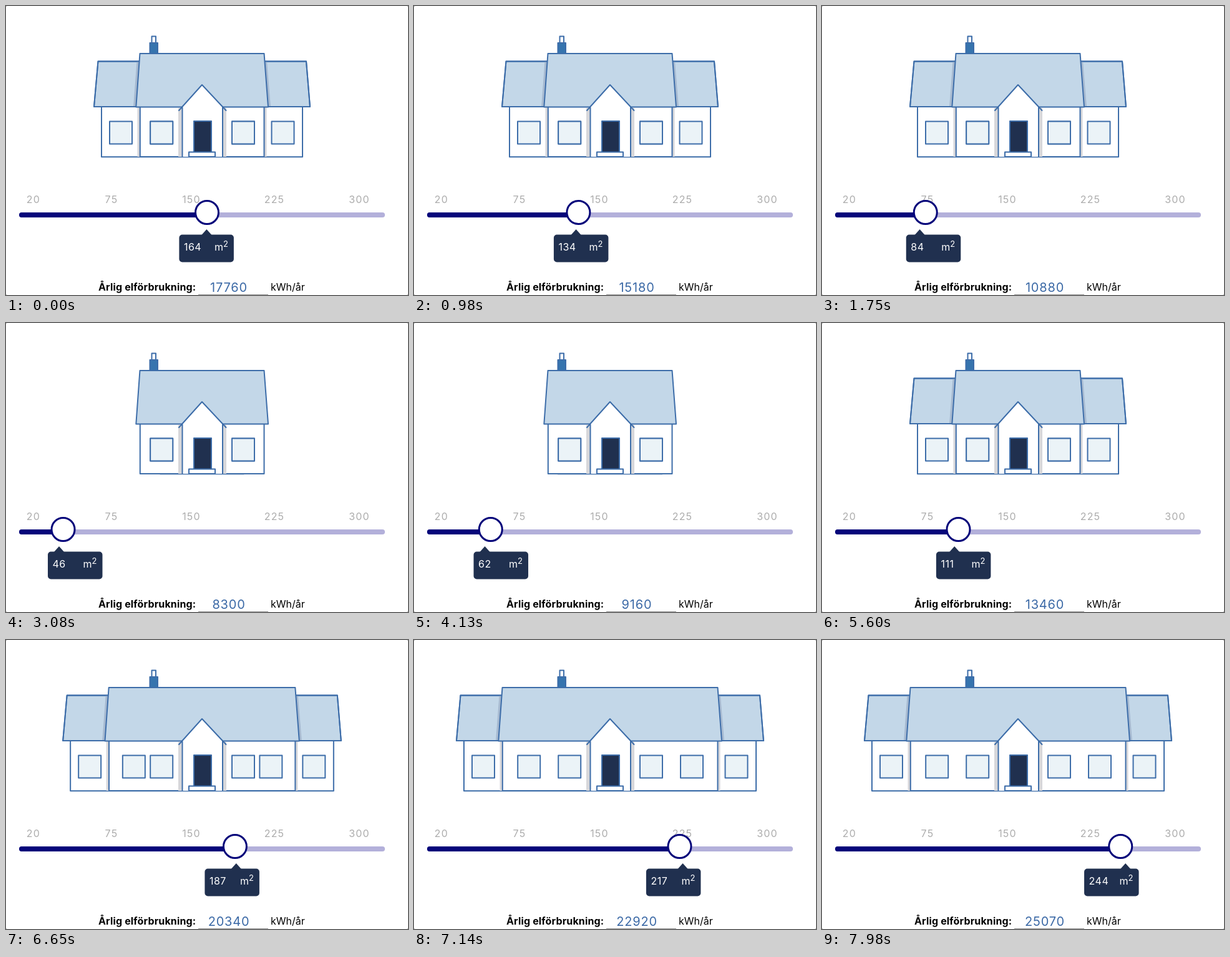
These frames come from a looping animation (644 px wide and 462 px high, 8 s). An HTML page:

```html
<!DOCTYPE html>
<html lang="sv">
<head>
<meta charset="utf-8">
<style>
  html, body { margin: 0; width: 100%; height: 100%; overflow: hidden; background: #999; }
  svg { display: block; width: 644px; height: 462px; background: #fff; border-radius: 2px; font: 16px Inter, sans-serif; }
  .line { stroke: #3d6da9; stroke-width: 2; stroke-linejoin: round; stroke-linecap: round; }
  .roof { fill: #c3d7e8; }
  .white { fill: #fff; }
  .glass { fill: #ebf3f7; }
  .dark { fill: #20304f; }
  .shade { fill: #d7d7da; }
  .scale { fill: #adadad; letter-spacing: 1.2px; text-anchor: middle; }
  #usage { font-size: 20px; letter-spacing: .8px; fill: #3b69a6; text-anchor: middle; }
</style>
</head>
<body>
<svg viewBox="0 0 644 462">
  <defs>
    <clipPath id="wingClip"><path id="wingOutline"/></clipPath>
    <rect id="pane" class="line glass" y="184.5" width="36" height="36"/>
  </defs>

  <g id="wings">
    <path id="wingWall" class="line white"/>
    <use id="wingPaneL" href="#pane"/><use id="wingPaneR" href="#pane"/>
    <path id="wingRoof" class="line roof"/>
    <g clip-path="url(#wingClip)">
      <path id="roofShade" fill="#a6b9d0"/>
      <path id="wallShade" class="shade"/>
    </g>
    <path id="wingEdge" class="line" fill="none"/>
  </g>

  <g id="chimney" class="line">
    <rect x="233.5" y="48.5" width="6.5" height="12" fill="#fff"/>
    <rect x="230.5" y="59" width="12.5" height="17" fill="#3674ae"/>
  </g>
  <path id="mainWall" class="line white"/>
  <use id="outerPaneL" href="#pane"/><use id="outerPaneR" href="#pane"/>
  <use href="#pane" x="231.2"/><use href="#pane" x="362"/>
  <path id="mainRoof" class="line roof"/>

  <g id="porch">
    <path class="shade" d="M276 163h6v78h-6zM347 163h6v78h-6z"/>
    <path class="white" d="M314 126L282.5 161V241H347V161Z"/>
    <path class="line" fill="none" d="M277 167L314 126L352.500 167M282.500 162V241M347 162V241"/>
    <rect class="line dark" x="301" y="184" width="28" height="50"/>
    <rect class="line white" x="293" y="233.500" width="42" height="7.500"/>
  </g>

  <g id="scale"></g>
  <rect x="21" y="330" width="586" height="8" rx="4" fill="#b3b0da"/>
  <rect id="fill" x="21" y="330" height="8" rx="4" fill="#04047a"/>
  <circle id="thumb" cy="330" r="18.500" fill="#fff" stroke="#04047a" stroke-width="3"/>

  <g id="tip" fill="#fff">
    <path id="arrow" class="dark" d="M-9 367L0 357L9 367Z"/>
    <rect class="dark" y="365.500" width="87.500" height="44" rx="5"/>
    <text id="area" x="7.500" y="391" letter-spacing=".5"></text>
    <text x="56.500" y="391">m<tspan dy="-6" font-size="13">2</tspan></text>
  </g>

  <text x="148" y="455" font-weight="700" letter-spacing=".15">Årlig elförbrukning:</text>
  <text id="usage" x="357" y="457"></text>
  <path d="M308 461.500H420" stroke="#8d8d8d"/>
  <text x="424" y="455">kWh/år</text>
</svg>

<script>
const LOOP = 8000, STEP = 70, DURATION = 500, MID = 314;
const $ = id => document.getElementById(id);
const set = (id, attrs) => {
  for (const name in attrs) $(id).setAttribute(name, attrs[name]);
};
const clamp = (x, lo, hi) => Math.min(hi, Math.max(lo, x));

// Time in ms and slider value in square metres.
const drag = [
  [0, 164], [560, 164], [630, 163], [700, 163], [1400, 90], [1540, 90],
  [1750, 84], [2160, 60], [2380, 51], [2870, 51], [3080, 46], [3360, 38],
  [3500, 38], [4057, 60], [4130, 62], [4340, 81], [5110, 108], [5530, 108],
  [5600, 111], [6450, 175], [6650, 187], [7560, 242], [7770, 242], [7980, 244]
];

function areaAt(t) {
  const i = drag.findIndex(point => point[0] > t);
  if (i < 0) return drag[drag.length - 1][1];
  const [t0, v0] = drag[i - 1], [t1, v1] = drag[i];
  return Math.round(v0 + (v1 - v0) * (t - t0) / (t1 - t0));
}

// cubic-bezier(.25, .1, .25, 1)
function ease(x) {
  if (x <= 0 || x >= 1) return clamp(x, 0, 1);
  const curve = (s, a, b) => 3 * s * (1 - s) ** 2 * a + 3 * s * s * (1 - s) * b + s ** 3;
  let lo = 0, hi = 1;
  for (let i = 0; i < 20; i++) {
    const s = (lo + hi) / 2;
    if (curve(s, .25, .25) < x) lo = s; else hi = s;
  }
  return curve(lo, .1, 1);
}
const since = (t, start) => ease((t - start) / DURATION);

function drawHouse(t) {
  const wide = 73 * since(t, 6450);
  const tucked = 94 * (since(t, 2165) - since(t, 4057));
  const out = wide - tucked;
  const l = x => x - out, r = x => x + out;
  const ml = x => x - wide, mr = x => x + wide;

  const wall = `M${l(153)} 161V241.300H${r(475)}V161Z`;
  const roof = `M${l(147.500)} 88.500H${r(481)}L${r(487)} 161H${l(141)}Z`;
  set('wingWall', { d: wall });
  set('wingRoof', { d: roof });
  set('wingEdge', { d: roof });
  set('wingOutline', { d: wall + roof });
  set('wingPaneL', { x: l(166) });
  set('wingPaneR', { x: r(425.500) });
  set('roofShade', { d:
    `M${ml(209.500)} 89H${ml(216)}V161H${ml(204)}ZM${mr(412)} 89H${mr(418)}L${mr(424)} 161H${mr(412)}Z` });
  set('wallShade', { d:
    `M${ml(210.500)} 162H${ml(215)}V241H${ml(210.500)}ZM${mr(413)} 162H${mr(417.500)}V241H${mr(413)}Z` });

  set('mainWall', { d: `M${ml(214.800)} 161V241H${mr(413.500)}V161Z` });
  set('mainRoof', { d: `M${ml(214.500)} 76H${mr(413.500)}L${mr(420)} 161.500H${ml(208.300)}Z` });
  const spread = wide * 65 / 73;
  set('outerPaneL', { x: 231.2 - spread });
  set('outerPaneR', { x: 362 + spread });
}

function drawSlider(area) {
  const x = 322 + 1.953 * (area - 164);
  const left = 67 + 1.783 * (area - 46);
  set('fill', { width: x - 21 });
  set('thumb', { cx: x });
  set('tip', { transform: `translate(${left})` });
  set('arrow', { transform: `translate(${clamp(44 + .277 * (area - 164), 18, 69.500)})` });
  $('area').textContent = area;
  const round = area < 60 || area >= 175 ? Math.ceil : Math.floor;
  $('usage').textContent = 4000 + 430 * round(area / 5);
}

function frame() {
  const t = Math.floor(performance.now() % LOOP / STEP) * STEP;
  drawHouse(t);
  drawSlider(areaAt(t));
  requestAnimationFrame(frame);
}

$('scale').innerHTML = [[20, 44], [75, 169], [150, 297], [225, 430], [300, 566]]
  .map(([label, x]) => `<text class="scale" x="${x}" y="315">${label}</text>`).join('');
frame();
</script>
</body>
</html>
```
